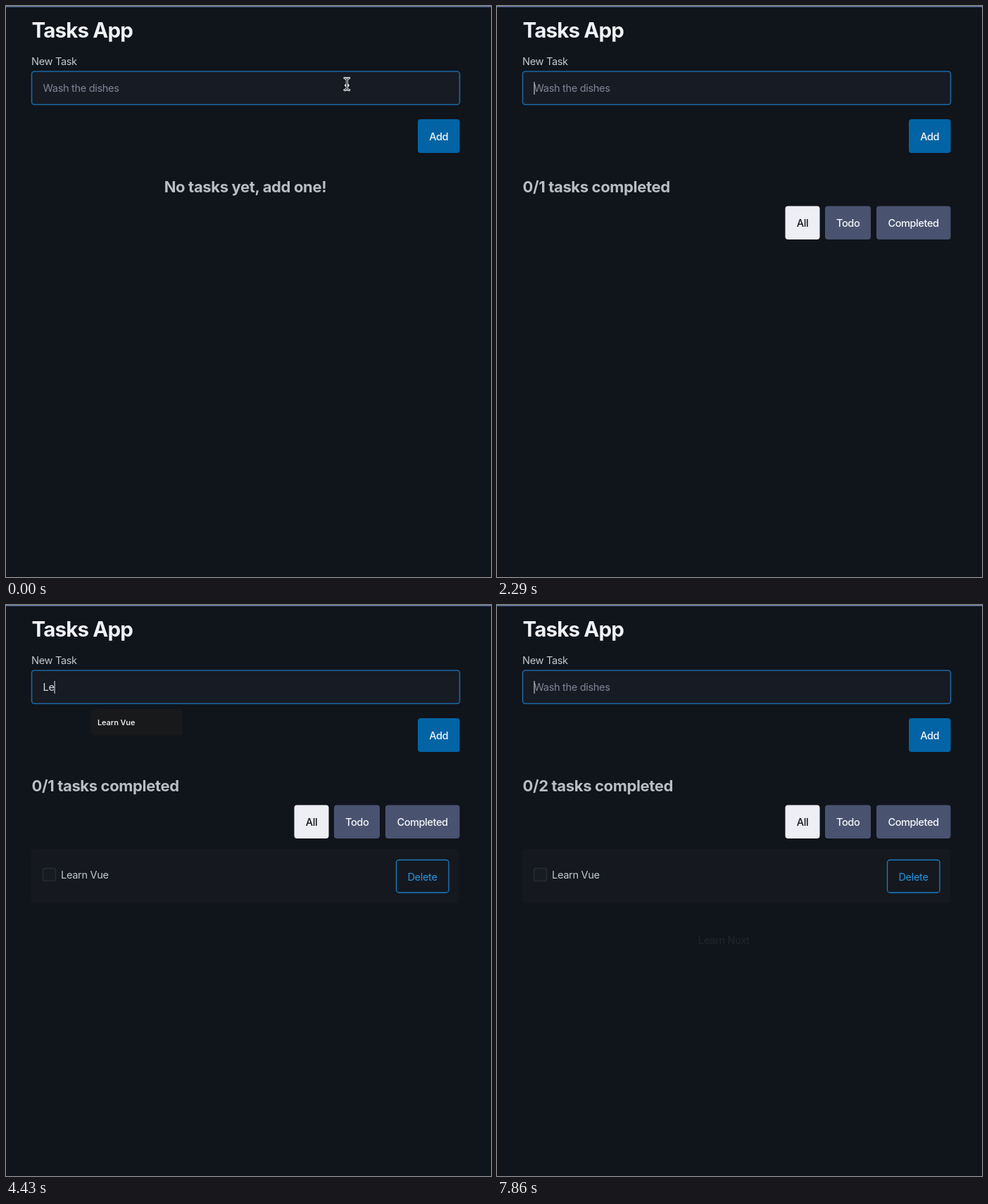
These frames come from a looping animation (689 px wide and 812 px high, 8 s). An HTML page:

```html
<!DOCTYPE html>
<html lang="en">
<head>
<meta charset="utf-8">
<title>Tasks App</title>
<style>
  html, body { margin: 0; width: 100%; height: 100%; overflow: hidden; background: #10141b; }
  svg { display: block; width: 689px; height: 812px; }
  text { font: 400 14.6px Inter, "Open Sans", sans-serif; letter-spacing: -.024em; white-space: pre; fill: #c3c7cf; }
  .mid { text-anchor: middle; }
  .btn { font-weight: 500; letter-spacing: -.03em; fill: #f4f6f9; }
  h1, .h1 { font-size: 29.5px; font-weight: 700; letter-spacing: -.028em; fill: #f0f2f5; }
  .h2 { font-size: 22px; font-weight: 700; letter-spacing: -.016em; fill: #b9bdc5; }
  .item { animation: enter .5s ease both paused; }
  @keyframes enter {
    from { transform: translateX(230px); opacity: 0; }
    to { transform: none; opacity: 1; }
  }
</style>
</head>
<body>
<svg viewBox="0 0 689 812">
  <defs>
    <g id="row">
      <rect x="36" y="347" width="608" height="77" rx="4" fill="#15191f"/>
      <rect x="52.5" y="374.5" width="18" height="18" rx="3" fill="#171b23" stroke="#272c35" stroke-width="1.5"/>
      <rect x="554.5" y="362.5" width="74.5" height="46.5" rx="4" fill="none" stroke="#1b7cc4" stroke-width="1.3"/>
      <text class="mid" x="591.5" y="391.5" style="fill:#2993e0">Delete</text>
    </g>
  </defs>

  <rect width="689" height="812" fill="#10141b"/>
  <rect width="689" height="1.5" fill="#6c82b0"/>
  <text class="h1" x="36.5" y="45">Tasks App</text>
  <text x="36" y="83.5">New Task</text>
  <rect x="36.5" y="93" width="608" height="47.3" rx="4" fill="#171b23" stroke="#1a68a3" stroke-width="1.6"/>
  <text id="field" x="52.5" y="122"></text>
  <rect id="caret" y="108" width="1" height="18" fill="#e6e9ee"/>
  <g id="pointer" fill="none" stroke-linecap="round">
    <path id="beam" d="M481 102.5q3.3 0 3.3 3v11q0 3 3.3 3M487.6 102.5q-3.3 0-3.3 3v11q0 3-3.3 3M482.5 113h3.6" stroke="#eef0f2" stroke-width="2.8"/>
    <use href="#beam"/>
    <path d="M481 102.5q3.3 0 3.3 3v11q0 3 3.3 3M487.6 102.5q-3.3 0-3.3 3v11q0 3-3.3 3" stroke="#15191f" stroke-width="1"/>
  </g>

  <rect x="585" y="161" width="59.5" height="48" rx="4" fill="#0264a5"/>
  <text class="btn mid" x="614.7" y="190.5">Add</text>
  <text id="empty" class="h2 mid" x="340" y="264.5">No tasks yet, add one!</text>

  <g id="list">
    <text id="count" class="h2" x="36.5" y="264.5"></text>
    <rect x="409.5" y="284.5" width="49" height="47.5" rx="4" fill="#eeeff4"/>
    <text class="btn mid" x="434" y="314" style="fill:#12151b">All</text>
    <rect x="466" y="284.5" width="65" height="47.5" rx="4" fill="#495370"/>
    <text class="btn mid" x="498.7" y="314">Todo</text>
    <rect x="539" y="284.5" width="105.5" height="47.5" rx="4" fill="#495370"/>
    <text class="btn mid" x="591.5" y="314">Completed</text>
    <g class="item" data-start="2286">
      <use href="#row"/>
      <text x="78" y="388.5">Learn Vue</text>
    </g>
    <g transform="translate(0 93)">
      <g class="item" data-start="7807">
        <use href="#row"/>
        <text x="78" y="388.5">Learn Nuxt</text>
      </g>
    </g>
  </g>

  <g id="hint">
    <path d="M131 149l5-4 5 4z" fill="#17191b"/>
    <rect x="120" y="148" width="131.5" height="37.5" rx="5" fill="#17191b"/>
    <text x="130" y="171.3" style="font-size:11px;font-weight:600;letter-spacing:-.01em;fill:#e4e6e8">Learn Vue</text>
  </g>
</svg>
<script>
  const $ = id => document.getElementById(id);
  const LOOP = 8000, TICK = 1000 / 7;
  const FIRST_ADD = 16, SECOND_ADD = 55;

  // [tick, typed text, caret blink phase]
  const keys = [
    [0, "", 4], [1, "L"], [2, "Le"], [3, "Lea"], [4, "Lear"], [5, "Learn"],
    [7, "Learn "], [11, "Learn V"], [13, "Learn Vue"], [FIRST_ADD, "", 2],
    [30, "L"], [31, "Le"], [32, "Lea"], [33, "Lear"], [34, "Learn"], [35, "Learn "],
    [38, "Learn N"], [45, "Learn Nu"], [51, "Learn Nux"], [53, "Learn Nuxt"],
    [SECOND_ADD, ""]
  ];
  const items = document.querySelectorAll(".item");
  const show = (el, on) => { el.style.display = on ? "" : "none"; };

  function draw(tick) {
    const [start, typed, phase = 0] = keys.findLast(k => k[0] <= tick);
    const field = $("field");
    field.textContent = typed || "Wash the dishes";
    field.style.fill = typed ? "#dfe2e8" : "#7d8596";
    $("caret").setAttribute("x", 52.5 + (typed ? field.getComputedTextLength() : 0));
    show($("caret"), (tick - start + phase) % 7 < 4);
    show($("pointer"), tick < 1);
    show($("hint"), tick >= 30 && tick < 34);

    const added = tick >= FIRST_ADD;
    show($("empty"), !added);
    show($("list"), added);
    $("count").textContent = `0/${tick < SECOND_ADD ? 1 : 2} tasks completed`;
    for (const item of items) {
      item.style.animationDelay = `${item.dataset.start - tick * TICK}ms`;
    }
  }

  // The screen refreshes seven times a second.
  let last = -1;
  const origin = performance.now();
  function loop() {
    const time = (performance.now() - origin) % LOOP;
    const tick = Math.min(55, Math.floor((time + 6) / TICK));
    if (tick !== last) draw(last = tick);
    requestAnimationFrame(loop);
  }
  loop();
</script>
</body>
</html>
```
